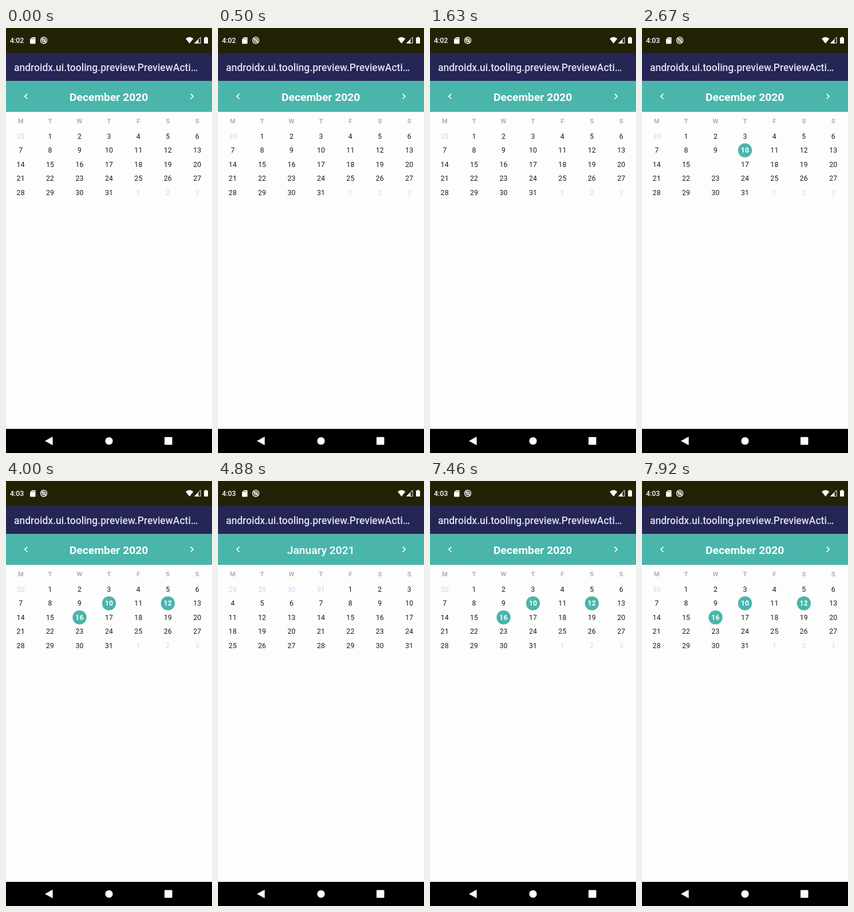
Recreate the animation shown at these times as an HTML page. Size 360 by 740 pixels, loop 8 s.

```html
<!DOCTYPE html>
<html lang="en">
<head>
<meta charset="utf-8">
<title>Calendar</title>
<style>
html, body { margin: 0; width: 100%; height: 100%; overflow: hidden; background: #fdfdfe; }
svg { display: block; width: 360px; height: 740px; font-family: Roboto, sans-serif; }
.mid { text-anchor: middle; }
.day { font-size: 12.26px; letter-spacing: .2px; fill: #1d1b18; }
.out { fill: #d8d2f7; }
.on { fill: #fff; font-weight: 700; }
.week { font-size: 11.4px; font-weight: 700; fill: #b5b2a5; }
.title { font-size: 19.27px; font-weight: 700; fill: #fff; }
</style>
</head>
<body>
<svg viewBox="0 0 360 740">
  <rect width="360" height="740" fill="#fdfdfe"/>
  <rect width="360" height="44" fill="#232205"/>
  <rect y="43.5" width="360" height="49" fill="#252556"/>
  <rect y="92.5" width="360" height="53.5" fill="#4ab5ab"/>
  <rect y="698" width="360" height="42"/>

  <g fill="#fff">
    <text id="clock" x="7" y="26" font-size="12.3" font-weight="500"></text>
    <path d="M45.5 16h5a1 1 0 0 1 1 1v9.500a1 1 0 0 1-1 1h-7.500a1 1 0 0 1-1-1v-7z"/>
    <path d="M45.500 17.500v2M47.500 17.500v2M49.500 17.500v2" stroke="#232205" stroke-width=".8"/>
    <g fill="none" stroke="#fff" stroke-width="1.4">
      <circle cx="66" cy="21.500" r="5.500"/>
      <circle cx="66" cy="21.500" r="2.600"/>
      <path d="M62.300 18l7.400 7"/>
    </g>
    <path d="M314 18.500q6.700-5.500 13.400 0l-6.700 8.500z"/>
    <path d="M329.500 26.500l10.500-10.500v10.500z" fill="none" stroke="#fff"/>
    <path d="M330 26.500l6.500-6.500v6.500z"/>
    <path d="M348 15.500h3v1.200h2v10.300h-7v-10.300h2z"/>
  </g>
  <text x="14" y="74.500" font-size="17.52" font-weight="500" fill="#dfdfee">androidx.ui.tooling.preview.PreviewActi…</text>

  <g fill="none" stroke="#fff" stroke-width="1.7">
    <path d="M37.300 114.700l-4.400 4.400 4.400 4.400M322.700 114.700l4.400 4.400-4.400 4.400"/>
  </g>
  <g fill="#fff">
    <path d="M68.500 719l12.800-7v14z" stroke="#fff" stroke-width=".6" stroke-linejoin="round"/>
    <circle cx="180" cy="719" r="6.600"/>
    <rect x="277" y="712.300" width="13.500" height="13.500" rx="1"/>
  </g>
  <g id="week"></g>
  <g id="dec"></g>
  <g id="jan"></g>
</svg>
<script>
const LOOP = 8000, TEAL = '#4ab5ab';
const NEXT = 4630, BACK = 7200, MINUTE = 1700;
const $ = id => document.getElementById(id);
const colX = i => 25.7 + i * 51.43;
const rowY = i => 188.5 + i * 24.5;

function add(parent, tag, attrs, text = '') {
  const el = document.createElementNS('http://www.w3.org/2000/svg', tag);
  for (const k in attrs) el.setAttribute(k, attrs[k]);
  el.textContent = text;
  parent.append(el);
  return el;
}

[...'MTWTFSS'].forEach((c, i) =>
  add($('week'), 'text', { x: colX(i), y: 165.6, class: 'mid week' }, c));

// picks: day of month -> time of the tap
function month(id, name, lead, prevLen, len, picks) {
  const g = $(id), marks = [];
  add(g, 'text', { x: 179.7, y: 126.5, class: 'mid title' }, name);
  for (let i = 0; i < 35; i++) {
    const n = i - lead + 1, out = n < 1 || n > len;
    const x = colX(i % 7), y = rowY(Math.floor(i / 7));
    const at = out ? undefined : picks[n];
    const disc = at && add(g, 'circle', { cx: x, cy: y, r: 12.2 });
    const label = add(g, 'text', { x, y: y + 4.4, class: 'mid day' + (out ? ' out' : '') },
      n < 1 ? n + prevLen : n > len ? n - len : n);
    if (at) marks.push({ at, disc, label });
  }
  return { g, marks };
}

const dec = month('dec', 'December 2020', 1, 30, 31, { 10: 1700, 16: 2670, 12: 3420 });
const jan = month('jan', 'January 2021', 4, 31, 31, { 3: 5500, 16: 6380 });
jan.g.querySelector('.title').style.fontWeight = 500;

// the label turns white first, then the disc fades in through green
function discColor(age) {
  if (age < 80) return 'none';
  if (age < 165) return '#90d8aa';
  return age < 245 ? '#58bcab' : TEAL;
}

function draw(now) {
  const t = now % LOOP, showJan = t >= NEXT && t < BACK;
  dec.g.style.display = showJan ? 'none' : '';
  jan.g.style.display = showJan ? '' : 'none';
  $('clock').textContent = t < MINUTE ? '4:02' : '4:03';
  for (const { at, disc, label } of [...dec.marks, ...jan.marks]) {
    disc.setAttribute('fill', discColor(t - at));
    label.classList.toggle('on', t >= at);
  }
}

const start = performance.now();
function tick() {
  draw(performance.now() - start);
  requestAnimationFrame(tick);
}
tick();
</script>
</body>
</html>
```
